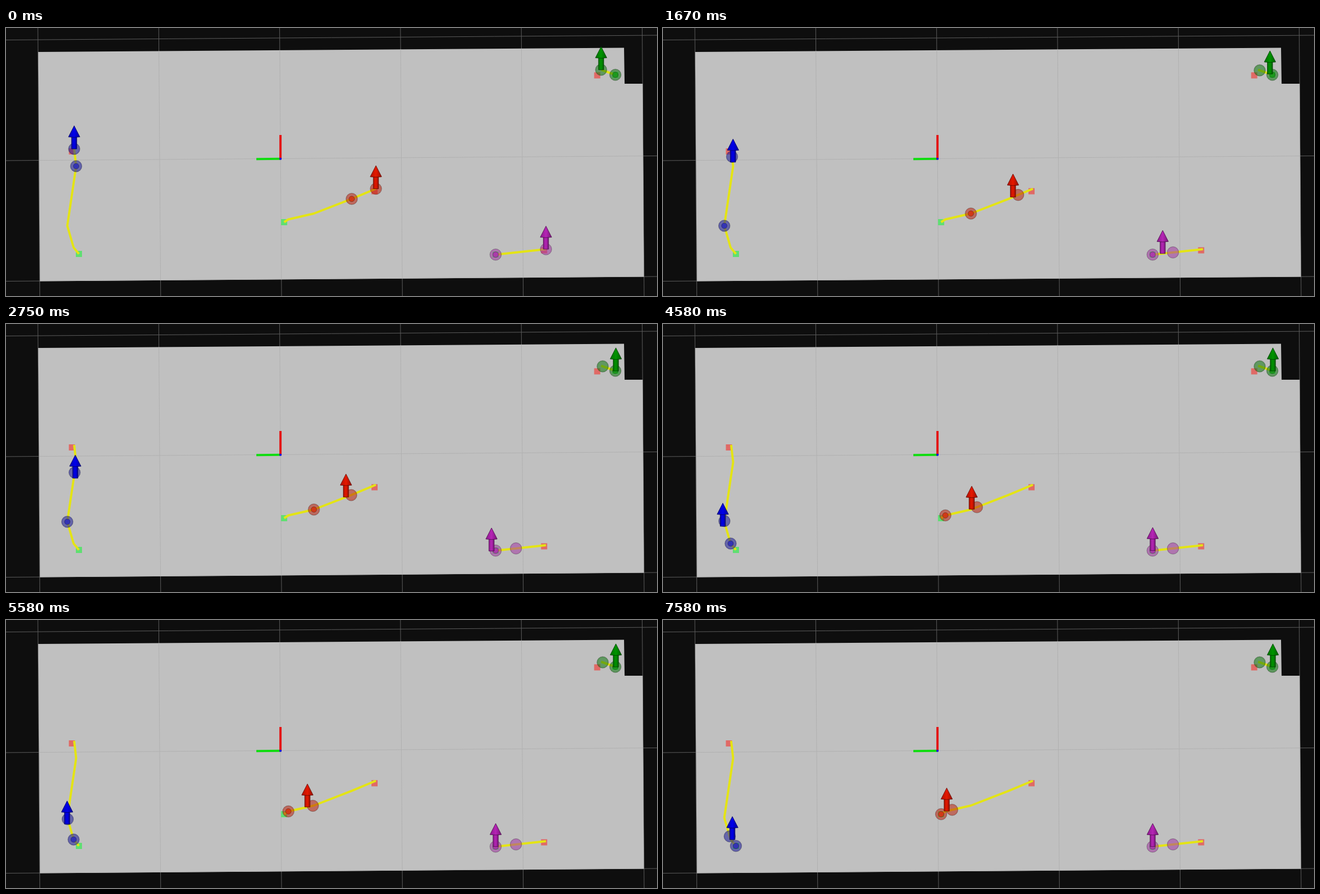
These frames come from a looping animation (1165 px wide and 481 px high, 8 s). An HTML page with a canvas:

```html
<!DOCTYPE html>
<html>
<head>
<meta charset="utf-8">
<style>
html, body { margin: 0; width: 100%; height: 100%; overflow: hidden; background: #0e0e0e; }
canvas { display: block; }
</style>
</head>
<body>
<canvas id="stage" width="1165" height="481"></canvas>
<script>
const ctx = document.getElementById('stage').getContext('2d');
const LOOP = 8000;
const UPDATES = [580, 1670, 2750, 3670, 4580, 5580, 6580, 7580];
const LAG = 10;    // marker behind the robot, along the path
const REACH = 15;  // a waypoint this close counts as passed

// travel: [update, distance driven]; track: the line driven where it leaves the path
const robots = [
  {
    hue: [0, 0, 236], ball: '20,20,150', core: '#3434b4', start: [118, 221.5],
    path: [[122, 217], [125.5, 248], [109.7, 355], [121, 394], [130.5, 405.5]],
    track: [[122, 217], [125.5, 242], [124, 277], [107, 363], [120, 381], [125, 397]],
    travel: [[0, 0], [2, 24], [3, 60], [5, 148], [6, 152], [7, 170], [8, 184]]
  },
  {
    hue: [230, 24, 0], ball: '185,30,10', core: '#d03a18', start: [659.5, 293],
    path: [[662, 288.5], [618.7, 306.7], [551, 333], [505.3, 343.5], [497.7, 348.5]],
    travel: [[0, 0], [3, 58], [5, 118], [7, 145], [8, 164]]
  },
  {
    hue: [182, 36, 182], ball: '160,50,160', core: '#aa3caa', start: [963, 399],
    path: [[966.3, 397], [876.2, 406.7]],
    travel: [[0, 0], [2, 72.5], [3, 98], [4, 90.5]], markerEnd: 54
  },
  {
    hue: [0, 148, 0], ball: '10,115,10', core: '#1c9a1c', start: [1058, 85],
    path: [[1065, 75], [1090.5, 84]],
    travel: [[0, 0], [2, 22.5], [3, 28]], markerEnd: 3
  }
];

const mix = (a, b, k) => a + (b - a) * k;
const span = (a, b) => Math.hypot(b[0] - a[0], b[1] - a[1]);

function distanceAt(keys, step) {
  const i = keys.findIndex(([s]) => s > step);
  if (i < 0) return keys[keys.length - 1][1];
  const [a, b] = [keys[i - 1], keys[i]];
  return mix(a[1], b[1], (step - a[0]) / (b[0] - a[0]));
}

// Point at a distance along the line, running straight on past its end.
function pointAt(points, distance) {
  let i = 1;
  while (i < points.length - 1 && distance > span(points[i - 1], points[i])) {
    distance -= span(points[i - 1], points[i++]);
  }
  const [a, b] = [points[i - 1], points[i]];
  const k = distance / span(a, b);
  return [mix(a[0], b[0], k), mix(a[1], b[1], k)];
}

function nextWaypoint(path, distance) {
  let length = 0;
  return path.find((p, i) => {
    if (i) length += span(path[i - 1], p);
    return length > distance + REACH;
  }) || path[path.length - 1];
}

function trace(points) {
  ctx.beginPath();
  points.forEach(([x, y]) => ctx.lineTo(x, y));
}

function line(points, color, width) {
  trace(points);
  ctx.strokeStyle = color;
  ctx.lineWidth = width;
  ctx.stroke();
}

function disc(x, y, r, fill, edge) {
  ctx.beginPath();
  ctx.arc(x, y, r, 0, 2 * Math.PI);
  ctx.fillStyle = fill;
  ctx.fill();
  ctx.strokeStyle = edge;
  ctx.lineWidth = 1;
  ctx.stroke();
}

function square([x, y], color) {
  ctx.fillStyle = color;
  ctx.fillRect(x - 5.5, y - 5.5, 11, 11);
}

function grid(color) {
  for (let i = 0; i < 6; i++) {
    const x = 57 + i * 216.3;
    line([[x, 0], [x + 3.5, 481]], color, 1);
  }
  for (let i = 0; i < 3; i++) {
    const y = 21.5 + i * 216.5;
    line([[0, y], [1165, y - 8.5]], color, 1);
  }
}

function floor() {
  ctx.fillStyle = '#0e0e0e';
  ctx.fillRect(0, 0, 1165, 481);
  grid('#5c5c5c');
  trace([[57.7, 42.9], [1106, 35.6], [1107, 100], [1139.3, 100], [1141.5, 446.5], [60.8, 454.5]]);
  ctx.fillStyle = '#c0c0c0';
  ctx.fill();
  ctx.save();
  ctx.clip();
  grid('#b0b0b0');
  ctx.restore();
  line([[448, 235.2], [491, 234.8]], '#10dc10', 4);
  line([[491.2, 192], [491.2, 235]], '#e41010', 4);
  ctx.fillStyle = '#0000e0';
  ctx.fillRect(489.5, 233, 3.5, 3.5);
}

function ball([x, y], rgb, core) {
  const shade = ctx.createRadialGradient(x, y, 0, x, y, 10.5);
  shade.addColorStop(0.7, `rgba(${rgb},.52)`);
  shade.addColorStop(1, `rgba(${rgb},.62)`);
  disc(x, y, 10.3, shade, 'rgba(40,40,40,.35)');
  if (core) disc(x, y, 5, core, 'rgba(0,0,0,.3)');
}

function arrow([x, y], hue) {
  const tone = k => `rgb(${hue.map(c => c * k)})`;
  const paint = half => {
    const g = ctx.createLinearGradient(x - half, 0, x + half, 0);
    [0.75, 1, 0.65].forEach((k, i) => g.addColorStop(i / 2, tone(k)));
    ctx.fillStyle = g;
    ctx.fill();
    ctx.strokeStyle = tone(0.4);
    ctx.lineWidth = 0.8;
    ctx.stroke();
  };
  ctx.beginPath();
  ctx.rect(x - 4.7, y - 23, 9.4, 23);
  paint(4.7);
  ctx.beginPath();
  ctx.moveTo(x, y - 41.5);
  ctx.lineTo(x + 10.2, y - 21.5);
  ctx.quadraticCurveTo(x, y - 20, x - 10.2, y - 21.5);
  ctx.closePath();
  paint(10.2);
}

function drawRobot({ hue, ball: rgb, core, start, path, track = path, travel, markerEnd = Infinity }, step) {
  const driven = distanceAt(travel, step);
  const marker = Math.min(Math.max(driven - LAG, 0), markerEnd);
  square(start, '#e06a66');
  square(path[path.length - 1], '#5fdf72');
  line(path, '#e4e414', 4);
  ball(pointAt(path, marker), rgb);
  ball(nextWaypoint(path, driven), rgb, core);
  arrow(pointAt(track, driven), hue);
}

function draw(now) {
  const step = UPDATES.filter(u => u <= now % LOOP).length;
  floor();
  robots.forEach(r => drawRobot(r, step));
}

ctx.lineJoin = 'round';
const began = performance.now();
function tick() {
  draw(performance.now() - began);
  requestAnimationFrame(tick);
}
tick();
</script>
</body>
</html>
```
